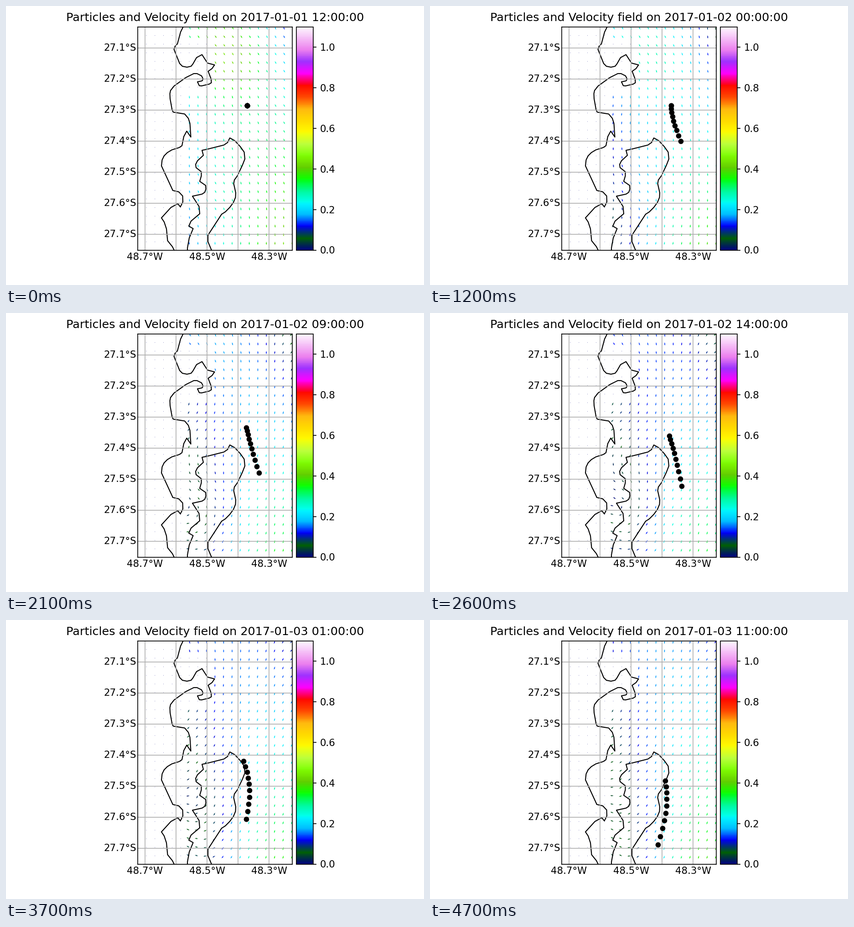
A matplotlib script that plays this animation: 917x611 px, repeating every 4.8 s.

```python
import numpy as np
import matplotlib.pyplot as plt
from matplotlib.animation import FuncAnimation

W, H, DPI = 917, 611, 152.75
HOURS = 48
LEFT, RIGHT, TOP, BOTTOM = 289, 628, 45.5, 534.5

plt.rcParams["font.family"] = "DejaVu Sans"

# Coastline corners as x, y pairs in pixels
MAINLAND = [
    389, 45, 383, 57, 376, 83, 371, 88, 368.5, 95, 381, 126, 387, 132,
    397, 134, 406, 132, 410, 127, 418, 113, 430, 106.5, 442, 125,
    457.5, 129, 452, 137, 443.5, 143, 450, 160, 450.5, 168, 446, 171,
    429, 175, 424, 174.5, 420, 166, 430, 164, 432.5, 160, 429, 153,
    419, 148, 412, 148, 394, 157, 369, 175, 361, 185, 359.5, 192,
    360, 203, 364.5, 228, 367, 232.5, 392, 236.5, 400, 246, 403.5, 257,
    405.5, 287, 396.5, 274, 390, 286, 386, 306, 380, 310, 364, 315,
    354, 321, 347, 328, 342.5, 337, 341, 350, 366, 404, 379, 407,
    387.5, 416, 388, 429, 382.5, 440, 377, 433, 362, 441, 341, 464,
    347, 473, 352, 488, 354.5, 514, 365, 527, 369, 535]
ISLAND = [
    398, 535, 398, 530, 402, 508, 410.5, 487.5, 401, 482, 406, 471,
    425, 455, 423.5, 439, 409, 416.5, 430, 412, 436, 408, 438.5, 401,
    438, 393, 425, 384, 428.5, 372, 428.5, 363, 417, 354, 416, 347,
    420, 339, 433, 327, 430, 316, 440, 314, 478, 304.5, 486, 299,
    491, 289, 502, 295, 514, 308, 522.5, 320, 524, 335, 518.5, 349,
    507.5, 372, 501, 381, 499.5, 389, 504, 409, 503.5, 419, 499, 430,
    491, 441, 481, 451, 473, 456, 443, 502, 443, 516, 451, 535]

gx, gy = np.meshgrid(308 + 18.8 * np.arange(18), 45.9 + 18.83 * np.arange(26))
land = (gx < 395) | ((gx < 450) & (gy > 75) & (gy < 185))
# Position inside the wet part: p eastwards, q southwards, both 0 to 1
p, q = (gx - 402) / 225.6, (gy - 45.9) / 470.75


def bump(height, p0, q0, wp, wq):
    return height * np.exp(-((p - p0) / wp) ** 2 - ((q - q0) / wq) ** 2)


# Eastward and southward current in m/s on three days
turn = np.cos(np.pi * p)
EAST = [
    0.6 * p * q * (1 - q) + bump(0.22, 0.3, 0.05, 0.5, 0.2)
    + bump(0.1, 0.2, 0.78, 0.2, 0.15),
    (0.08 - 0.13 * p) * (1 - q) - 0.09 * q
    + bump(-0.07, 0, 0.38, 0.35, 0.12) + bump(0.09, 0.15, 0.72, 0.25, 0.14),
    -0.07 * p ** 2 * (1 - q) - (0.05 + 0.07 * p) * q
    + bump(-0.03, 0.1, 0.45, 0.3, 0.3),
]
SOUTH = [
    0.25 + 0.3 * p - 0.49 * p ** 2 + q * (0.5 * p ** 2 - 0.1)
    + bump(0.1, 0.35, 0.17, 0.4, 0.15),
    0.11 + 0.15 * p - 0.23 * p ** 2 + q * (0.07 - 0.21 * turn),
    0.12 + 0.2 * p - 0.22 * p ** 2 + q * (0.04 - 0.21 * turn),
]


def currents(hour):
    """Unit vectors and speed, linear between the daily fields."""
    day, rest = divmod(hour, 24)
    f = rest / 24
    u, v = (np.where(land, 0, (1 - f) * c[day] + f * c[day + 1])
            for c in (EAST, SOUTH))
    speed = np.hypot(u, v)
    safe = np.where(speed > 0, speed, 1)
    return u / safe, -v / safe, speed


# Particles leave START one by one; their chain is a parabola through
# three members at each key hour
COUNT, RELEASE_STEP = 10, 1.5
START = 528.5, 217.8
KEY_HOURS = [16, 26, 41, 47]
MEMBERS = [0, 5, 9]
CHAIN_X = [[554, 534, 529], [552, 536, 524.5],
           [516, 529, 519], [499.5, 518.5, 515.5]]
CHAIN_Y = [[320.5, 263, 230], [379, 307.5, 269],
           [457, 378, 325.5], [492, 407, 352]]


def hermite(t, tk, pk):
    """Smooth curve through pk at times tk, held at both ends."""
    m = np.gradient(pk, tk)
    t = np.clip(t, tk[0], tk[-1])
    i = np.clip(np.searchsorted(tk, t, side="right") - 1, 0, len(tk) - 2)
    h = tk[i + 1] - tk[i]
    s = (t - tk[i]) / h
    return ((1 + 2 * s) * (1 - s) ** 2 * pk[i] + s * (1 - s) ** 2 * h * m[i]
            + s * s * (3 - 2 * s) * pk[i + 1] - s * s * (1 - s) * h * m[i + 1])


def track(k):
    tk = np.array([RELEASE_STEP * k] + KEY_HOURS)
    xy = []
    for start, chain in zip(START, (CHAIN_X, CHAIN_Y)):
        pk = [np.polyval(np.polyfit(MEMBERS, c, 2), k) for c in chain]
        xy.append(hermite(np.arange(HOURS), tk, np.array([start] + pk)))
    return np.stack(xy, -1)


tracks = np.stack([track(k) for k in range(COUNT)], 1)


def pixel_axes(fig, x0, x1):
    return fig.add_axes([x0 / W, 1 - BOTTOM / H,
                         (x1 - x0) / W, (BOTTOM - TOP) / H])


fig = plt.figure(figsize=(6.0033, 4), dpi=DPI)
ax = pixel_axes(fig, LEFT, RIGHT)
ax.set(xlim=(LEFT, RIGHT), ylim=(BOTTOM, TOP), xticks=[], yticks=[])

grid = dict(color="#b0b0b0", lw=0.8, zorder=2)
for n in range(5):
    x = 305 + 68 * n
    ax.axvline(x, **grid)
    if n % 2 == 0:
        ax.text(x, 556, f"48.{7 - n}°W", ha="center", va="baseline")
for n in range(7):
    y = 92.3 + 67.95 * n
    ax.axhline(y, **grid)
    ax.text(286, y, f"27.{n + 1}°S", ha="right", va="center")

for coast in (MAINLAND, ISLAND):
    ax.plot(coast[::2], coast[1::2], color="black", lw=1, zorder=1.5)

arrows = ax.quiver(gx, gy, *currents(0), cmap="gist_ncar", scale=50, zorder=1)
arrows.set_clim(0, 1.1)
fig.colorbar(arrows, cax=pixel_axes(fig, 637, 674))
dots = ax.scatter(*tracks[0].T, s=20, color="black", zorder=20)
title = ax.set_title("")


def update(hour):
    arrows.set_UVC(*currents(hour))
    dots.set_offsets(tracks[hour])
    now = np.datetime64("2017-01-01T12:00:00") + np.timedelta64(hour, "h")
    title.set_text("Particles and Velocity field on "
                   + str(now).replace("T", " "))
    return arrows, dots, title


anim = FuncAnimation(fig, update, frames=HOURS, interval=100, repeat=True)
plt.show()
```
